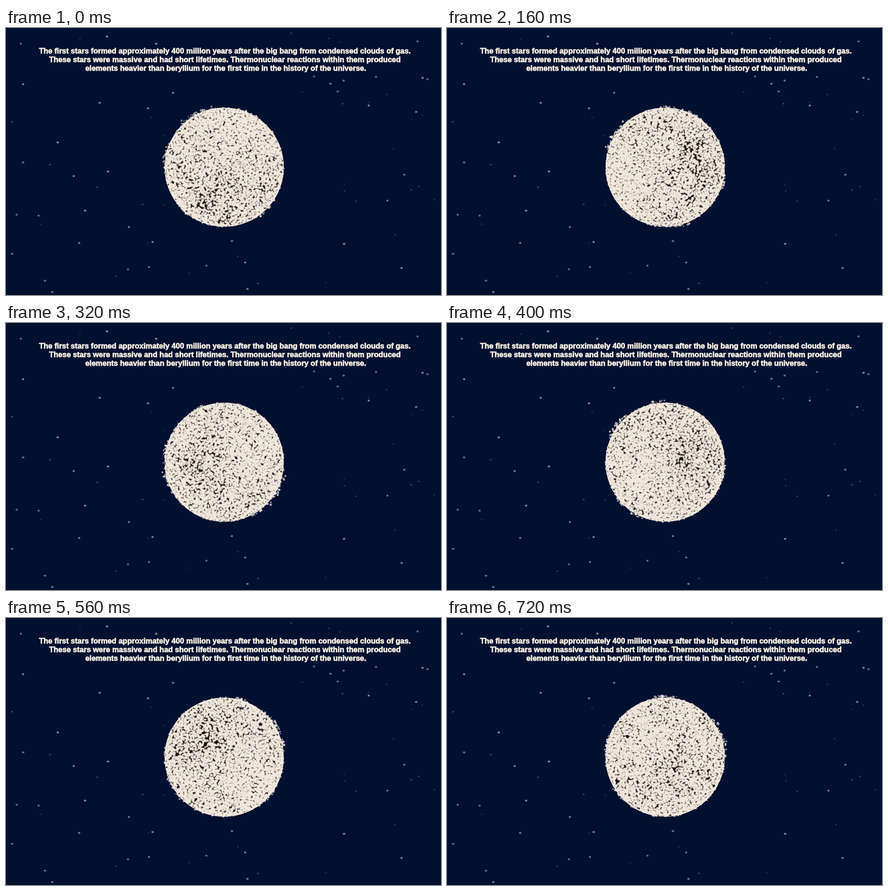
Recreate the animation shown at these times as an HTML page with a canvas. Size 954x587 px, loop 0.8 s.

```html
<!DOCTYPE html>
<html lang="en">
<head>
<meta charset="utf-8">
<title>First stars</title>
<style>
html, body { margin: 0; width: 100%; height: 100%; overflow: hidden; background: #00102f; }
canvas, svg { position: absolute; left: 0; top: 0; width: 954px; height: 587px; display: block; }
text {
  font: bold 16.5px "Liberation Sans", Arial, sans-serif;
  text-anchor: middle; fill: #fbefe2; stroke: #fbefe2; stroke-width: .85;
}
</style>
</head>
<body>
<canvas id="sky" width="954" height="587"></canvas>
<svg viewBox="0 0 954 587">
  <text x="480" y="56">The first stars formed approximately 400 million years after the big bang from condensed clouds of gas.</text>
  <text x="480" y="75">These stars were massive and had short lifetimes. Thermonuclear reactions within them produced</text>
  <text x="482" y="93.5">elements heavier than beryllium for the first time in the history of the universe.</text>
</svg>
<script>
const W = 954, H = 587, STEP = 80;
const CX = 478.5, CY = 306, R = 130.7;
const CREAM = '243,233,223';
const TAU = Math.PI * 2;

// Main stars, brightest first; the faint ones are seeded.
const stars = [
  [221,18], [329,34], [37,123], [113,251], [795,170], [913,109], [741,474], [321,470],
  [223,315], [148,325], [173,401], [899,184], [205,164], [269,437], [101,580], [366,142],
  [311,176], [160,472], [529,573], [867,527], [524,515], [313,525], [495,468], [836,379],
  [873,322], [811,107], [740,115], [711,122], [902,29], [32,34], [37,295], [71,412],
  [23,410], [85,555], [267,530], [439,522], [675,106], [727,139], [924,112], [13,496]
];

// One pose per step: centre of the dark region, direction of the main flare in degrees.
const poses = [
  [460,372,-118], [500,340,-60], [545,285,-150], [515,265,-80], [440,320,30],
  [525,280,-140], [470,360,150], [430,262,-32], [450,310,-97], [495,325,-20]
];

function random(seed) {
  return () => {
    seed = (seed + 0x6D2B79F5) | 0;
    let t = Math.imul(seed ^ (seed >>> 15), 1 | seed);
    t = (t + Math.imul(t ^ (t >>> 7), 61 | t)) ^ t;
    return ((t ^ (t >>> 14)) >>> 0) / 4294967296;
  };
}

function layer(w, h) {
  const c = document.createElement('canvas');
  c.width = w;
  c.height = h;
  return c;
}

function softDot(rgb, core) {
  const c = layer(32, 32), g = c.getContext('2d');
  const fill = g.createRadialGradient(16, 16, 0, 16, 16, 16);
  fill.addColorStop(0, `rgba(${rgb},1)`);
  fill.addColorStop(core, `rgba(${rgb},.95)`);
  fill.addColorStop(1, `rgba(${rgb},0)`);
  g.fillStyle = fill;
  g.fillRect(0, 0, 32, 32);
  return c;
}

const grain = softDot(CREAM, .35);
const glint = softDot('212,214,212', .2);

function put(g, dot, x, y, rx, ry = rx) {
  g.drawImage(dot, x - rx, y - ry, rx * 2, ry * 2);
}

function makeSky() {
  const c = layer(W, H), g = c.getContext('2d'), rnd = random(5);
  g.fillStyle = '#00102f';
  g.fillRect(0, 0, W, H);
  stars.forEach(([x, y], i) => {
    g.globalAlpha = .82 - .27 * i / stars.length;
    put(g, glint, x + .5, y + .5, 3.2 + rnd() * .8, 3);
  });
  for (let i = 0; i < 38; i++) {
    g.globalAlpha = .15 + rnd() * .25;
    put(g, glint, rnd() * W, rnd() * H, 2.8, 2.5);
  }
  return c;
}

function gauss(x, y, px, py, r) {
  return Math.exp(-((x - px) ** 2 + (y - py) ** 2) / (r * r));
}

// Grains pack the disc less tightly around the dark region, and more tightly opposite it.
function fillDisc(g, rnd, darkX, darkY) {
  const gap = 2.5, phase = rnd() * TAU;
  const lightX = CX - (darkX - CX) * 1.4, lightY = CY - (darkY - CY) * 1.4;
  g.save();
  g.beginPath();
  g.arc(CX, CY, R, 0, TAU);
  g.fillStyle = '#15120f';
  g.fill();
  g.clip();
  for (let y = CY - R; y < CY + R; y += gap) {
    for (let x = CX - R; x < CX + R; x += gap) {
      const px = x + (rnd() - .5) * 6, py = y + (rnd() - .5) * 6;
      const keep = rnd(), size = 2.5 + rnd() * 1.4;
      const d = Math.hypot(px - CX, py - CY) / R;
      const chance = .73
        + .09 * Math.sin(px / 15 + phase) * Math.sin(py / 18 - phase)
        - .25 * gauss(px, py, darkX, darkY, 50)
        + .2 * gauss(px, py, lightX, lightY, 60)
        + (d > .94 ? .15 : 0);
      if (keep < chance) put(g, grain, px, py, size);
    }
  }
  g.restore();
}

function drawLimb(g, rnd, flare) {
  g.lineWidth = 1.4;
  g.strokeStyle = `rgba(${CREAM},.7)`;
  g.beginPath();
  g.arc(CX, CY, R - .7, 0, TAU);
  g.stroke();

  const speck = (deg, out, size) => {
    const a = deg * Math.PI / 180;
    g.globalAlpha = .55 + rnd() * .4;
    put(g, grain, CX + (R + out) * Math.cos(a), CY + (R + out) * Math.sin(a), size);
  };
  const cluster = (deg, spread, reach, count) => {
    for (let i = 0; i < count; i++) {
      speck(deg + (rnd() + rnd() - 1) * spread, reach * rnd() ** 1.4, 1.5 + rnd() * 2.2);
    }
  };
  cluster(flare, 20, 8, 28);
  for (let i = 0; i < 4; i++) cluster(rnd() * 360, 6 + rnd() * 14, 2 + rnd() * 5, 10);
  for (let i = 0; i < 70; i++) speck(rnd() * 360, rnd() * 1.4 - .7, 1.5 + rnd() * 2);
}

const sky = makeSky();

const frames = poses.map(([darkX, darkY, flare], n) => {
  const c = layer(W, H), g = c.getContext('2d'), rnd = random(101 + n * 37);
  g.drawImage(sky, 0, 0);
  fillDisc(g, rnd, darkX, darkY);
  drawLimb(g, rnd, flare);
  return c;
});

const view = document.getElementById('sky').getContext('2d');

function tick() {
  const n = Math.floor(performance.now() / STEP) % frames.length;
  view.drawImage(frames[n], 0, 0);
  requestAnimationFrame(tick);
}
tick();
</script>
</body>
</html>
```
